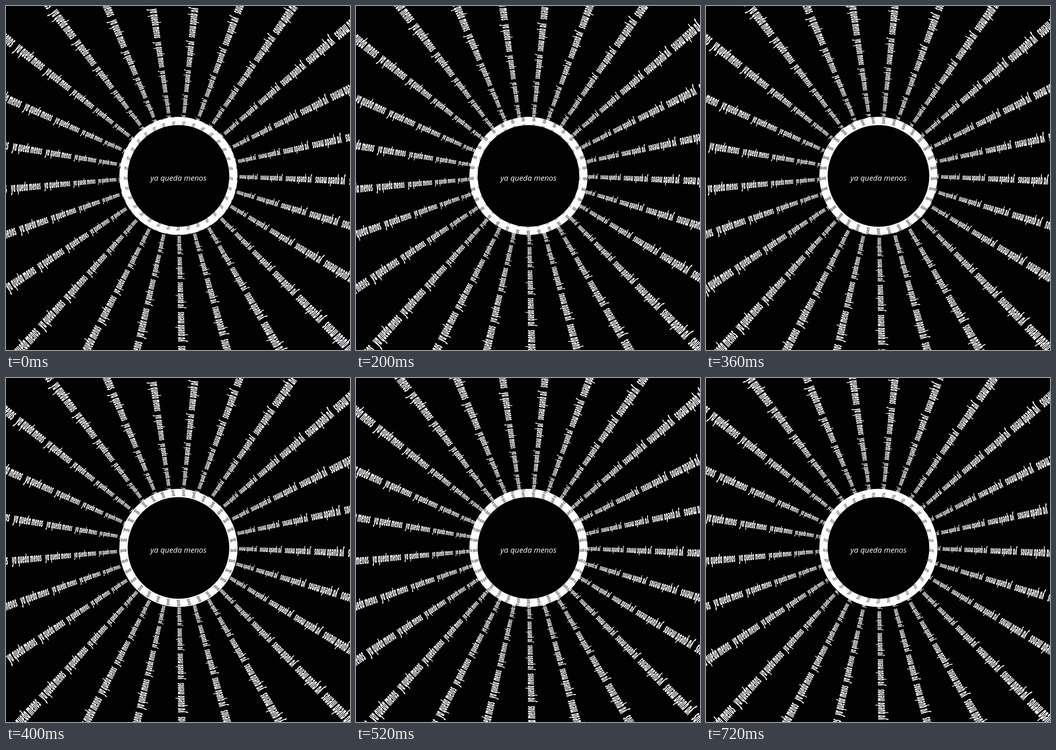
An HTML page with a canvas that plays this animation: 748 px wide and 748 px high, repeating every 760 ms.

```html
<!DOCTYPE html>
<html lang="es">
<head>
<meta charset="utf-8">
<title>ya queda menos</title>
<style>
  html, body { margin: 0; width: 100%; height: 100%; overflow: hidden; background: #020202; }
  canvas { display: block; }
</style>
</head>
<body>
<canvas id="stage" width="748" height="748"></canvas>
<script>
const ctx = document.getElementById('stage').getContext('2d');
const STEP = 40, STEPS = 19, RAYS = 25, RING_COPIES = 33;
const RING = { x: 375, y: 369.5, outer: 128.5, inner: 110.5 };
const HUB = { x: 373.5, y: 366 };
const BASE = 40;
const DEG = Math.PI / 180;
const BLACK = '#020202', WHITE = '#fdfdfd';
const FAMILY = '"Open Sans", "Noto Sans", sans-serif';
const font = (weight, size) => `italic ${weight} ${size}px ${FAMILY}`;

// Characters with their start and end along the phrase, from 0 to 1.
function layout(text, fontSpec) {
  ctx.font = fontSpec;
  const total = ctx.measureText(text).width;
  return [...text].map((char, i) => {
    const from = ctx.measureText(text.slice(0, i)).width;
    const to = ctx.measureText(text.slice(0, i + 1)).width;
    return { char, width: to - from, from: from / total, to: to / total };
  }).filter(glyph => glyph.char !== ' ');
}

const rayFont = font(800, BASE), ringFont = font(400, BASE);
const rayGlyphs = layout('ya queda menos', rayFont);
const ringGlyphs = layout('Ya queda', ringFont);

// Scroll of the rays, in phrases, keyed by step.
const scrollKeys = [[0, 0], [3, 0.23], [7, 0.67], [10, 1.03], [13, 1.335], [15, 1.55], [18, 1.83], [19, 2]];
function rayScroll(step) {
  const i = scrollKeys.findIndex(key => key[0] > step);
  const [s0, v0] = scrollKeys[i - 1], [s1, v1] = scrollKeys[i];
  return v0 + (v1 - v0) * (step - s0) / (s1 - s0);
}

// Distance from the hub after s phrases towards it.
const rayRadius = s => 364 - 77.5 * s + 4.7 * s * s;
const rayEm = radius => 5 + 0.064 * radius;

// Distance from the ring's centre; the surface curves away at the inner rim.
function ringRadius(w) {
  const bend = w < 0 ? w * Math.PI / 2 : Math.sin(Math.min(w, 1) * Math.PI / 2);
  return RING.outer - 18 * bend;
}

// Fits one glyph between two radii, reading inwards.
function drawGlyph(glyph, centre, angle, r0, r1, em) {
  const c = Math.cos(angle), s = Math.sin(angle);
  const sx = (r0 - r1) / glyph.width, sy = em / BASE;
  const drop = 0.27 * em;
  ctx.setTransform(c * sx, s * sx, -s * sy, c * sy,
    centre.x - c * r0 - s * drop, centre.y - s * r0 + c * drop);
  ctx.fillText(glyph.char, 0, 0);
}

function drawRays(scroll) {
  ctx.font = rayFont;
  ctx.fillStyle = WHITE;
  for (let k = -4; k <= 4; k++) {
    for (const glyph of rayGlyphs) {
      const start = k + scroll % 1;
      const r0 = rayRadius(start + 0.885 * glyph.from);
      const r1 = rayRadius(start + 0.885 * glyph.to);
      if (r0 < 120 || r1 > 545) continue;
      for (let i = 0; i < RAYS; i++) {
        const angle = (-4.95 + i * 360 / RAYS) * DEG;
        drawGlyph(glyph, HUB, angle, r0, r1, rayEm((r0 + r1) / 2));
      }
    }
  }
  ctx.resetTransform();
}

function disc(radius, color) {
  ctx.fillStyle = color;
  ctx.beginPath();
  ctx.arc(RING.x, RING.y, radius, 0, 2 * Math.PI);
  ctx.fill();
}

function drawRing(step) {
  const period = 1.18;
  disc(RING.outer, WHITE);
  ctx.save();
  ctx.clip();
  ctx.font = ringFont;
  ctx.fillStyle = BLACK;
  for (let k = -1; k <= 1; k++) {
    const start = 0.34 + period * (step / STEPS + k);
    for (const glyph of ringGlyphs) {
      const w0 = start + 0.9 * glyph.from, w1 = start + 0.9 * glyph.to;
      if (w1 < 0 || w0 >= 1) continue;
      for (let i = 0; i < RING_COPIES; i++) {
        const angle = (270 + i * 360 / RING_COPIES) * DEG;
        drawGlyph(glyph, RING, angle, ringRadius(w0), ringRadius(w1), 10);
      }
    }
  }
  ctx.restore();
  disc(RING.inner, BLACK);
}

ctx.font = font(400, 100);
const titleFont = font(400, 100 * 122 / ctx.measureText('ya queda menos').width);

function draw(step) {
  ctx.resetTransform();
  ctx.fillStyle = BLACK;
  ctx.fillRect(0, 0, 748, 748);
  drawRays(rayScroll(step));
  drawRing(step);
  ctx.font = titleFont;
  ctx.fillStyle = WHITE;
  ctx.textAlign = 'center';
  ctx.fillText('ya queda menos', 375, 380);
  ctx.textAlign = 'left';
}

let shown = -1;
const began = performance.now();
function tick() {
  const step = Math.floor((performance.now() - began) / STEP) % STEPS;
  if (step !== shown) draw(shown = step);
  requestAnimationFrame(tick);
}
tick();
</script>
</body>
</html>
```
